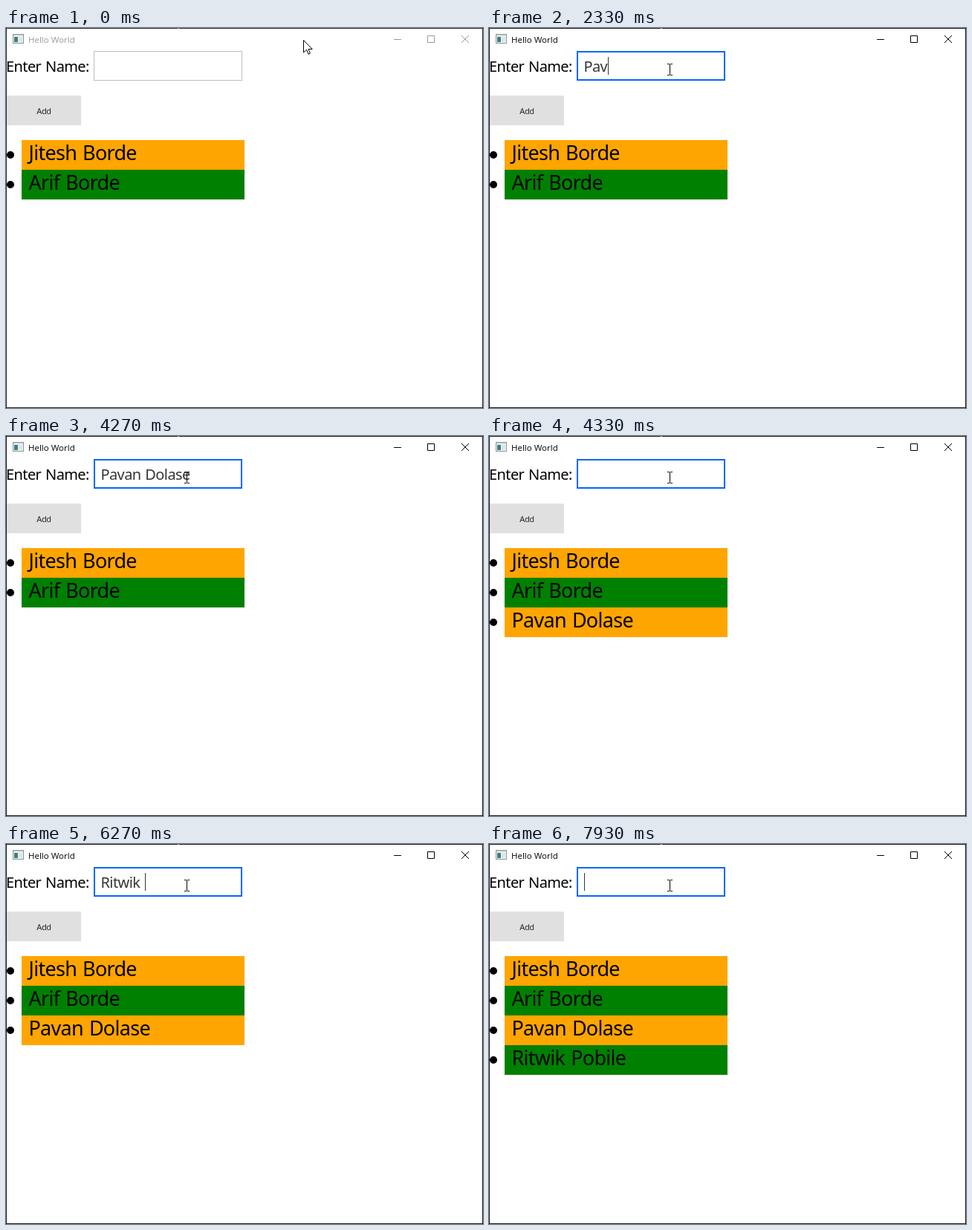
Animation of 642x512 px, one loop 8000 ms. Source, as an HTML page:

```html
<!DOCTYPE html>
<html lang="en">
<head>
<meta charset="utf-8">
<title>Hello World</title>
<style>
  html, body { margin: 0; width: 100%; height: 100%; overflow: hidden; background: #fff; }
  svg { display: block; width: 642px; height: 512px; }
  text { font-family: "Noto Sans", "Open Sans", sans-serif; letter-spacing: -.0265em; word-spacing: .06em; }
  .title { font: 11.5px "Open Sans", "Noto Sans", sans-serif; letter-spacing: 0; word-spacing: 0; }
  .label { font-size: 20px; letter-spacing: -.03em; }
  .row { font-size: 27px; }
  .add { font-size: 11px; font-weight: 500; fill: #26282a; text-anchor: middle; }
  #typed { fill: #353637; }
  #chrome { --ink: #999; --edge: #2b2b2b; }
  #chrome.active { --ink: #000; --edge: #1a1a1a; }
  .edge { fill: none; stroke: var(--edge); }
  .glyph { fill: none; stroke: var(--ink); }
  .title { fill: var(--ink); }
</style>
</head>
<body>
<svg viewBox="0 0 642 512">
  <rect width="642" height="512" fill="#fff"/>
  <g id="chrome">
    <rect class="edge" x=".5" y=".5" width="641" height="511"/>
    <rect x="231" width="2" height="1" fill="#999"/>
    <g>
      <rect x="9.5" y="8.5" width="14" height="12" fill="#f4f6f6" stroke="#8b9296"/>
      <rect x="10" y="9" width="13" height="2" fill="#d5dadd"/>
      <rect x="11" y="12" width="5" height="7" fill="#3c7f83"/>
      <rect x="17" y="12" width="5" height="7" fill="#dfe5e6"/>
    </g>
    <text class="title" x="30" y="20">Hello World</text>
    <path class="glyph" d="M522 15.5h10M567.5 10.5h9v9h-9z"/>
    <path class="glyph" d="M613 10l10 10M623 10l-10 10"/>
  </g>

  <text class="label" x="0" y="59">Enter Name:</text>
  <rect id="field" fill="#fff"/>
  <text class="label" id="typed" x="127.5" y="59"></text>
  <rect id="caret" y="39" width="1" height="24" fill="#353637"/>

  <rect x="1" y="91" width="100" height="40" fill="#e0e0e0"/>
  <text class="add" x="51" y="115.5">Add</text>

  <g id="list"></g>

  <path id="arrow" d="M.5 .5V17l4-3.7L7 19.2l2.4-1L7 12.5h5.2z" fill="#fff" stroke="#000"/>
  <path id="beam" d="M-3 -7.5h3m1 0h3M.5 -7V7M-3 7.5h3m1 0h3" fill="none" stroke="#000"/>
</svg>
<script>
const LOOP = 8000, TICK = 200 / 3, FOCUS = 930;
const $ = id => document.getElementById(id);

// Each row: name and the time it joins the list
const rows = [
  ['Jitesh Borde', 0],
  ['Arif Borde', 0],
  ['Pavan Dolase', 4330],
  ['Ritwik Pobile', 7930]
];

// Time of every key press, one per letter
const typing = [
  { name: rows[2][0], end: rows[2][1],
    keys: [1930, 2130, 2330, 2400, 2530, 2600, 2930, 3130, 3200, 3400, 3600, 3730] },
  { name: rows[3][0], end: rows[3][1],
    keys: [5470, 5670, 5870, 5930, 6130, 6200, 6270, 6530, 6670, 7400, 7470, 7670, 7730] }
];

// Spans in which the caret is hidden
const blinks = [[0, FOCUS], [1470, 1800], [4270, 4800], [7200, 7400]];

const within = (t, [a, b]) => t >= a && t < b;

function add(tag, attrs, parent) {
  const el = document.createElementNS('http://www.w3.org/2000/svg', tag);
  set(el, attrs);
  return parent.appendChild(el);
}

function set(el, attrs) {
  for (const k in attrs) el.setAttribute(k, attrs[k]);
}

const show = (el, on) => set(el, { visibility: on ? 'visible' : 'hidden' });

const items = rows.map(([name], i) => {
  const g = add('g', { transform: `translate(0 ${151 + 40 * i})` }, $('list'));
  add('circle', { cx: 6, cy: 20, r: 5 }, g);
  add('rect', { x: 21, width: 300, height: 40, fill: i % 2 ? '#008000' : '#ffa500' }, g);
  add('text', { class: 'row', x: 30.5, y: 27 }, g).textContent = name;
  return g;
});

function textAt(t) {
  const run = typing.find(r => within(t, [r.keys[0], r.end]));
  return run ? run.name.slice(0, run.keys.filter(k => k <= t).length) : '';
}

function drawPointer(t) {
  const step = Math.floor((t - 470) / TICK + 1.1);
  const p = Math.max(0, Math.min(1, step / 7));
  const e = p * p * (3 - 2 * p);
  const x = Math.round(400 - 157 * e), y = Math.round(16 + 40 * e);
  const inField = x < 318 && y >= 31;
  for (const id of ['arrow', 'beam']) set($(id), { transform: `translate(${x} ${y})` });
  show($('arrow'), !inField);
  show($('beam'), inField);
}

function drawField(t) {
  const w = t >= FOCUS ? 2 : 1;
  set($('field'), {
    x: 118 + w / 2, y: 31 + w / 2, width: 200 - w, height: 40 - w,
    'stroke-width': w, stroke: w > 1 ? '#0066ff' : '#bdbdbd'
  });
  const text = textAt(t).replace(/ /g, '\u00a0');
  if ($('typed').textContent !== text) $('typed').textContent = text;
  const width = text ? $('typed').getComputedTextLength() : 0;
  set($('caret'), { x: 128 + Math.round(width) });
  show($('caret'), !blinks.some(b => within(t, b)));
}

function draw(t) {
  $('chrome').classList.toggle('active', t >= FOCUS);
  drawField(t);
  items.forEach((g, i) => show(g, t >= rows[i][1]));
  drawPointer(t);
}

const start = performance.now();
function frame() {
  draw((performance.now() - start) % LOOP);
  requestAnimationFrame(frame);
}
frame();
</script>
</body>
</html>
```
